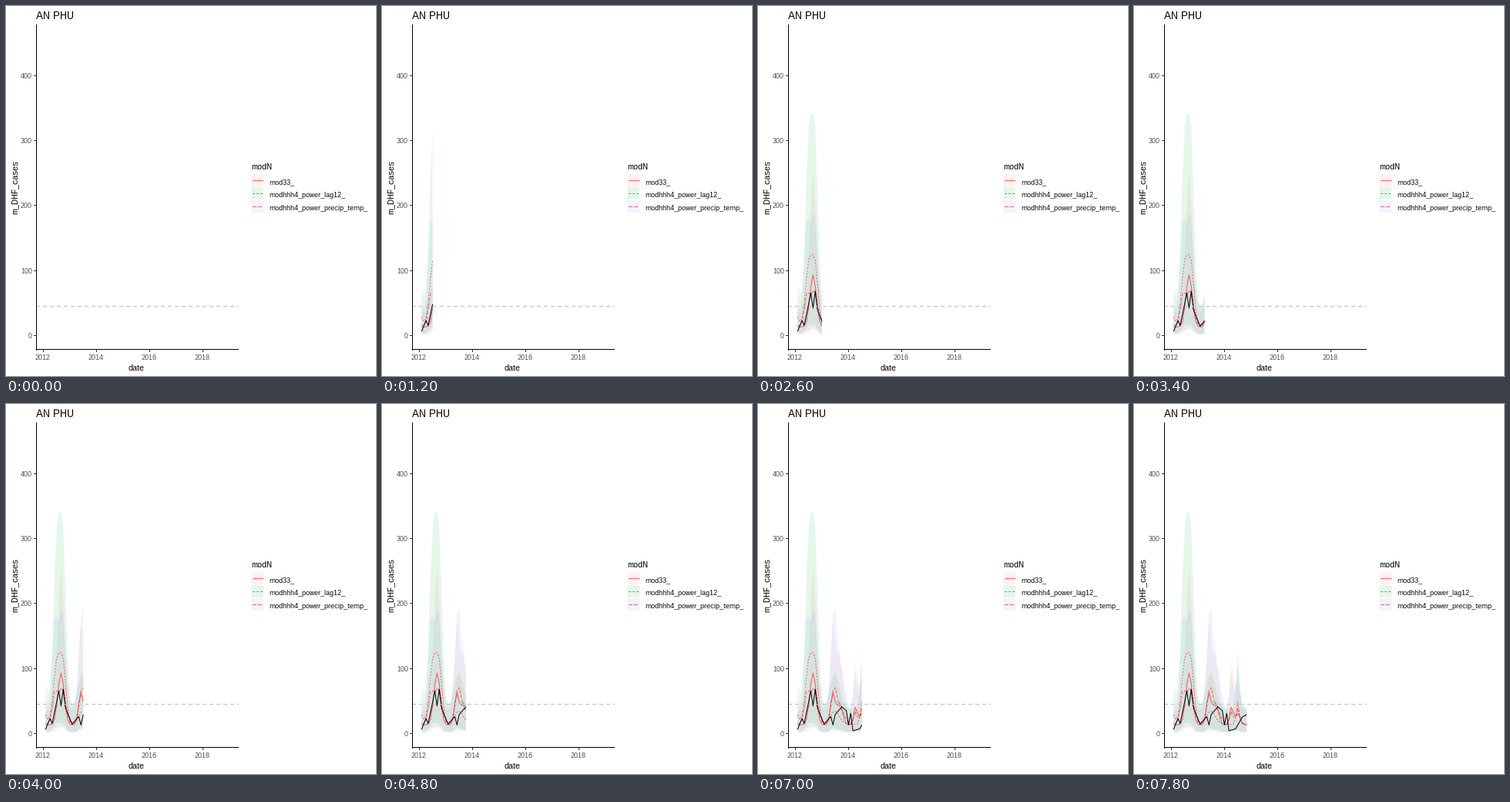
A matplotlib script for the animation above (8000 ms loop, 480 by 480 pixels).

```python
import numpy as np
import matplotlib.pyplot as plt
from matplotlib.animation import FuncAnimation
from matplotlib.patches import Polygon, Rectangle

plt.rcParams.update({
    "font.family": "Liberation Sans",
    "text.hinting": "native",
    "text.hinting_factor": 1,
    "lines.scale_dashes": False,
    "lines.solid_capstyle": "butt",
    "lines.dash_capstyle": "butt",
    "path.simplify": False,
})

SIZE, DPI = 480, 72
FRAMES, STEP_MS = 40, 200
FULL_FRAMES, FULL_MONTHS = 99, 83   # pace of the reveal
HIGH, LOW = 2.75, 0.13              # interval bounds relative to the mean
FADED_RED = (1, 0, 0, 0.6)

# name, ribbon colour, dash, base level, outbreaks as (month, height, spread)
MODELS = [
    ("mod33_", "#F8766D", "-", 13,
     [(7, 80, 2), (15.9, 48, 1.4), (19, 34, 1.8), (26.2, 28, 1.1),
      (29, 18, 1.5)]),
    ("modhhh4_power_lag12_", "#00BA38", (0, (2, 2)), 14,
     [(0, 14, 1), (5.2, 98, 2.2), (8, 82, 1.8), (16.8, 20, 3),
      (29, 34, 0.9)]),
    ("modhhh4_power_precip_temp_", "#619CFF", (0, (4, 2)), 15,
     [(4.2, 45, 1.5), (7.4, 55, 2.2), (16.6, 56, 1.9), (20, 18, 2),
      (26.2, 20, 1), (29, 24, 1)]),
]
# turning points of the observed cases: (month, cases)
TURNS = [(0, 6), (2, 23), (3, 15), (6, 65), (7, 42), (8, 68), (9, 39),
         (12, 14), (15, 26), (16, 13), (17, 29), (20, 41), (22, 35),
         (23, 13), (24, 31), (25, 4), (28, 7), (31, 25), (33, 29)]


def outbreak_curve(month, base, outbreaks):
    return base + sum(h * np.exp(-((month - m) / s) ** 2)
                      for m, h, s in outbreaks)


months = np.arange(34)
cases = np.interp(months, *zip(*TURNS))
curves = [outbreak_curve(months, base, outbreaks)
          for *_, base, outbreaks in MODELS]
# each month appears on the nearest whole frame
month_frames = np.round(months * FULL_FRAMES / FULL_MONTHS)


def px(month):
    return 51.3 + 2.875 * np.asarray(month)


def py(value):
    return 427.3 - 0.8425 * np.asarray(value)


fig = plt.figure(figsize=(SIZE / DPI, SIZE / DPI), dpi=DPI, facecolor="white")
ax = fig.add_axes([0, 0, 1, 1])
ax.set_xlim(0, SIZE)
ax.set_ylim(SIZE, 0)
ax.axis("off")


def line(xs, ys, color, z=1, style="-", smooth=False):
    return ax.plot(xs, ys, color=color, lw=1, ls=style, zorder=z,
                   antialiased=smooth)[0]


def label(x, y, text, size=9, color="black", ha="left", va="baseline", **kw):
    ax.text(x, y, text, fontsize=size, color=color, ha=ha, va=va, **kw)


# axes
line([39, 39], [24, 446], "black", 6)
line([39, 301], [445, 445], "black", 6)
for i in range(4):
    x = 48 + 69 * i
    line([x, x], [446, 448], "#333333", 6)
    label(x, 459, str(2012 + 2 * i), color="#4D4D4D", ha="center")
for value in range(0, 500, 100):
    y = int(py(value))
    line([36, 39], [y, y], "#333333", 6)
    label(34, y + 4, str(value), color="#4D4D4D", ha="right")
label(39, 17, "AN PHU", 13)
label(169.5, 473, "date", 11, ha="center")
label(12, 235, "m_DHF_cases", 11, ha="center", va="center", rotation=90)

# threshold
line([39, 301], [389, 389], "#BEBEBE", 5, (0, (4.27, 4.27)))

# legend
label(318, 212, "modN", 11)
for i, (name, color, style, *_) in enumerate(MODELS):
    y = 226 + 17 * i
    ax.add_patch(Rectangle((318, y - 8), 16, 16, fc=color, alpha=0.1, lw=0))
    line([320, 333], [y, y], FADED_RED, 2, style)
    label(341, y + 5, name)

# growing artists
ribbons, means = [], []
for _, color, style, *_ in MODELS:
    ribbon = Polygon([[0, 0], [0, 0]], fc=color, alpha=0.1, lw=0, zorder=2)
    ribbons.append(ax.add_patch(ribbon))
    means.append(line([], [], FADED_RED, 3, style, smooth=True))
case_line = line([], [], "black", 4, smooth=True)
artists = [*ribbons, *means, case_line]


def draw(frame):
    end = np.interp(frame, month_frames, months)
    shown = np.append(months[months < end], end)
    xs = px(shown)
    for curve, ribbon, mean in zip(curves, ribbons, means):
        values = np.interp(shown, months, curve)
        top = np.column_stack([xs, py(HIGH * values)])
        bottom = np.column_stack([xs, py(LOW * values)])
        ribbon.set_xy(np.vstack([top, bottom[::-1]]))
        mean.set_data(xs, py(values))
    case_line.set_data(xs, py(np.interp(shown, months, cases)))
    for artist in artists:
        artist.set_visible(frame > 0)
    return artists


anim = FuncAnimation(fig, draw, frames=FRAMES, interval=STEP_MS,
                     init_func=lambda: draw(0), repeat=True, repeat_delay=0)
plt.show()
```
